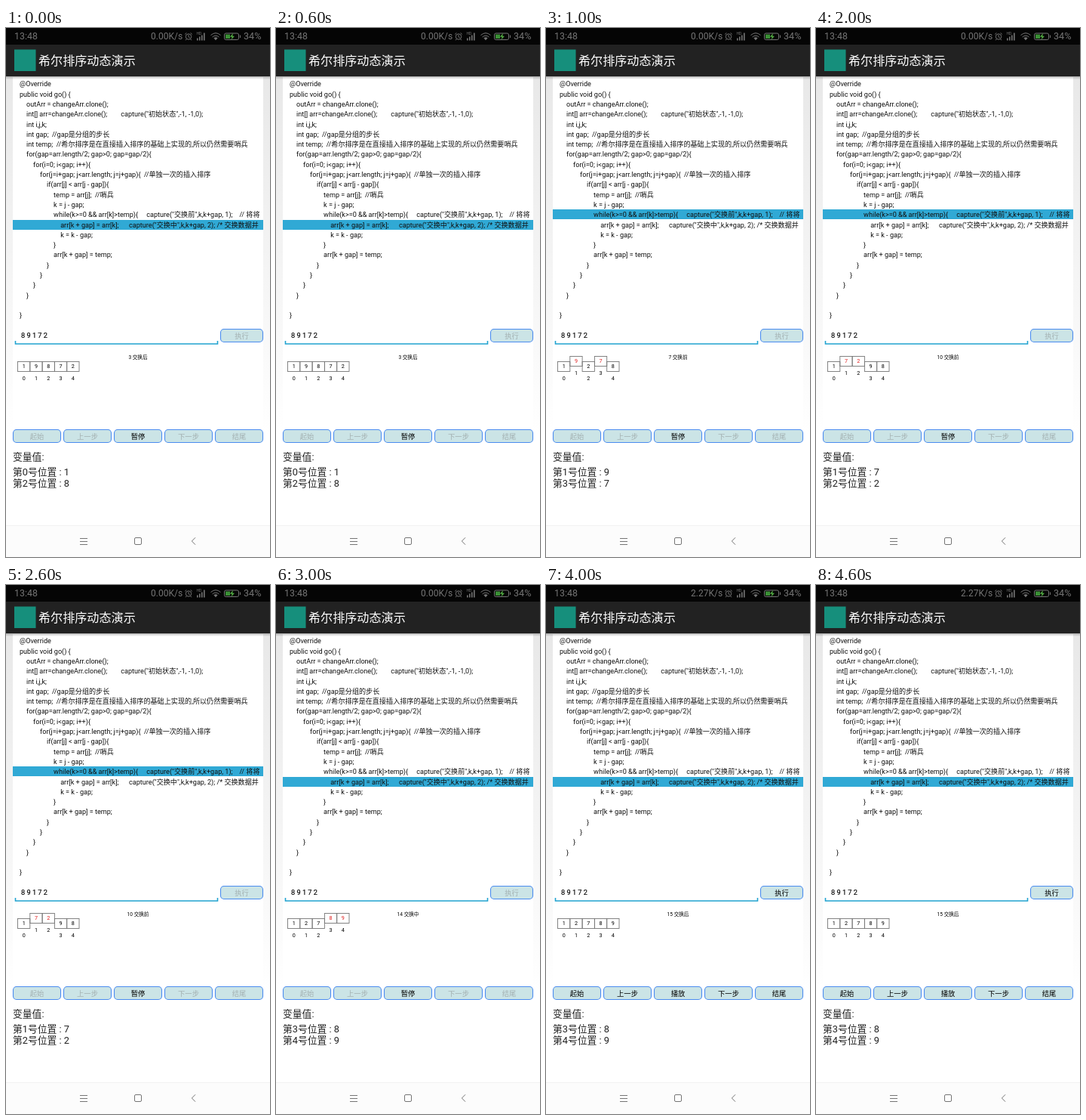
Recreate the animation shown at these times as an HTML page. Size 350x700 px, loop 5 s.

```html
<!DOCTYPE html>
<html lang="zh-CN">
<head>
<meta charset="utf-8">
<title>希尔排序动态演示</title>
<style>
  html, body { margin: 0; width: 100%; height: 100%; overflow: hidden; background: #fff; }
  svg { display: block; width: 100%; height: 100%; }
  text { font-family: Roboto, "Noto Sans CJK SC", "Noto Sans CJK", sans-serif; white-space: pre; fill: #111; }
  .status text { font-size: 12px; fill: #757575; }
  .code text { font-size: 9.1px; }
  .mid { text-anchor: middle; }
  .btn rect { fill: #cbe4e6; stroke: #4b8cf0; stroke-width: 1.1; }
  .btn text { font-size: 9.3px; fill: #000; }
  .btn.off text { fill: #a3b0b1; }
  .cells text { font-size: 7.2px; fill: #000; }
  .cells rect { fill: none; stroke: #777; stroke-width: .9; }
  .vars text { font-size: 12.8px; fill: #222; }
  .line { fill: none; stroke: #757575; stroke-width: 1; }
</style>
</head>
<body>
<svg viewBox="0 0 350 700" xmlns="http://www.w3.org/2000/svg">
  <defs>
    <linearGradient id="page" x2="0" y2="1">
      <stop offset="0" stop-color="#e8e8e8"/>
      <stop offset=".8" stop-color="#fff"/>
    </linearGradient>
    <linearGradient id="shade" x2="0" y2="1">
      <stop offset="0" stop-opacity=".25"/>
      <stop offset="1" stop-opacity="0"/>
    </linearGradient>
    <clipPath id="box"><rect x="9" y="65" width="332" height="327"/></clipPath>
  </defs>

  <rect y="64" width="350" height="595" fill="url(#page)"/>
  <rect x="9" y="65" width="332" height="594" fill="#fff"/>

  <g class="status">
    <rect width="350" height="23" fill="#050505"/>
    <text x="11" y="15.4" style="font-size:12.4px">13:48</text>
    <text id="speed" x="192" y="15.4"></text>
    <text x="315" y="15.4" style="font-size:12.6px">34%</text>
    <g class="line">
      <circle cx="242" cy="11.5" r="3.7"/>
      <path d="M242 9.2v2.6l1.8 1M237.2 8.4l2.2-2M246.8 8.4l-2.2-2M239.2 14.8l-1 1.4M244.8 14.8l1 1.4"/>
      <path d="M271.5 9.5q6.5-5.6 13 0M273.6 12q4.4-3.8 8.8 0"/>
      <rect x="289.5" y="7" width="19" height="8.5" rx="2"/>
      <path d="M310.5 9.5v3.5"/>
    </g>
    <path d="M275.4 13.2q2.6-2 5.2 0l-2.6 3z" fill="#757575"/>
    <rect x="291" y="8.5" width="6" height="5.5" fill="#3a8f35"/>
    <path d="M301 7l-4.2 4.8h2.8l-1 3.8 4.4-4.9h-2.8z" fill="#55b045"/>
    <text x="252.5" y="9" style="font-size:5px">HD</text>
    <path d="M253 16.5v-3h1.6v3zM256 16.5v-5h1.6v5zM259 16.5v-7h1.6v7zM262 16.5v-10h1.6v10z" fill="#757575"/>
  </g>

  <rect y="22" width="350" height="42" fill="#222"/>
  <rect y="64" width="350" height="4" fill="url(#shade)"/>
  <rect x="11" y="28.5" width="28.5" height="28.5" fill="#168f7c"/>
  <text x="43" y="49" style="font-size:16.1px;fill:#fff">希尔排序动态演示</text>

  <g class="code" clip-path="url(#box)">
    <rect id="mark" x="9" width="332" height="13" fill="#30a9d5"/>
    <g id="code"></g>
  </g>

  <text x="20" y="410.4" style="font-size:9.2px;fill:#000;stroke:#000;stroke-width:.15">8 9 1 7 2</text>
  <path d="M12.5 414v4h268v-4" fill="none" stroke="#20a3d0" stroke-width="1.6"/>

  <g id="buttons"></g>
  <text id="note" class="mid" x="175" y="437.6" style="font-size:6.6px;fill:#000"></text>
  <g id="cells" class="cells"></g>

  <g class="vars">
    <text x="9" y="571.5">变量值:</text>
    <text id="var0" x="9" y="591.7"></text>
    <text id="var1" x="9" y="606.5"></text>
  </g>

  <rect y="658" width="350" height="42" fill="#fcfcfc"/>
  <path d="M0 658.5h350" stroke="#f2f2f2"/>
  <g class="line">
    <path d="M98 675.5h10M98 679.5h10M98 683.5h10"/>
    <rect x="170.5" y="674.5" width="9" height="9" rx="1.5"/>
    <path d="M251 674.3l-4.6 4.7 4.6 4.7"/>
  </g>
</svg>

<script>
const STEP = 1000, PITCH = 13.3, CELL = 16.3;
const $ = id => document.getElementById(id);

const code = `@Override
public void go() {
    outArr = changeArr.clone();
    int[] arr=changeArr.clone();        capture("初始状态",-1, -1,0);
    int i,j,k;
    int gap;  //gap是分组的步长
    int temp;  //希尔排序是在直接插入排序的基础上实现的,所以仍然需要哨兵
    for(gap=arr.length/2; gap>0; gap=gap/2){
        for(i=0; i<gap; i++){
            for(j=i+gap; j<arr.length; j=j+gap){  //单独一次的插入排序
                if(arr[j] < arr[j - gap]){
                    temp = arr[j];  //哨兵
                    k = j - gap;
                    while(k>=0 && arr[k]>temp){     capture("交换前",k,k+gap, 1);    // 将将
                        arr[k + gap] = arr[k];      capture("交换中",k,k+gap, 2); /* 交换数据并
                        k = k - gap;
                    }
                    arr[k + gap] = temp;
                }
            }
        }
    }

}`.split("\n");

// up: the pair is lifted, its digits turn red
const steps = [
  { note: "3 交换后", arr: [1, 9, 8, 7, 2], pair: [0, 2], line: 14 },
  { note: "7 交换前", arr: [1, 9, 2, 7, 8], pair: [1, 3], line: 13, up: true },
  { note: "10 交换前", arr: [1, 7, 2, 9, 8], pair: [1, 2], line: 13, up: true },
  { note: "14 交换中", arr: [1, 2, 7, 8, 9], pair: [3, 4], line: 14, up: true },
  { note: "15 交换后", arr: [1, 2, 7, 8, 9], pair: [3, 4], line: 14, done: true }
];

const esc = s => s.replace(/&/g, "&amp;").replace(/</g, "&lt;");

$("code").innerHTML = code.map((s, n) =>
  `<text x="18" y="${77.3 + n * PITCH}">${esc(s)}</text>`).join("");

function button(x, y, w, label, on) {
  return `<g class="btn${on ? "" : " off"}">
    <rect x="${x + .5}" y="${y + .5}" width="${w - 1}" height="17" rx="4.5"/>
    <text class="mid" x="${x + w / 2}" y="${y + 12.5}">${label}</text></g>`;
}

function cell(value, i, s) {
  const up = s.up && s.pair.includes(i);
  const x = 15.5 + i * CELL, y = up ? 434.5 : 441.5, mid = x + CELL / 2;
  return `<rect x="${x}" y="${y}" width="${CELL}" height="13"/>
    <text class="mid" x="${mid}" y="${y + 8.8}"${up ? ' style="fill:#e02020"' : ""}>${value}</text>
    <text class="mid" x="${mid}" y="${y + 24.9}">${i}</text>`;
}

function show(s) {
  const labels = ["起始", "上一步", s.done ? "播放" : "暂停", "下一步", "结尾"];
  $("speed").textContent = s.done ? "2.27K/s" : "0.00K/s";
  $("mark").setAttribute("y", Math.round(67.4 + s.line * PITCH));
  $("note").textContent = s.note;
  $("cells").innerHTML = s.arr.map((v, i) => cell(v, i, s)).join("");
  $("buttons").innerHTML = button(284, 398, 57, "执行", s.done) +
    labels.map((t, i) => button(9 + i * 67, 531, 64, t, s.done || i === 2)).join("");
  s.pair.forEach((p, i) => $("var" + i).textContent = `第${p}号位置 : ${s.arr[p]}`);
}

let shown = -1;
function tick() {
  const now = Math.floor(performance.now() / STEP) % steps.length;
  if (now !== shown) show(steps[shown = now]);
  requestAnimationFrame(tick);
}
tick();
</script>
</body>
</html>
```
